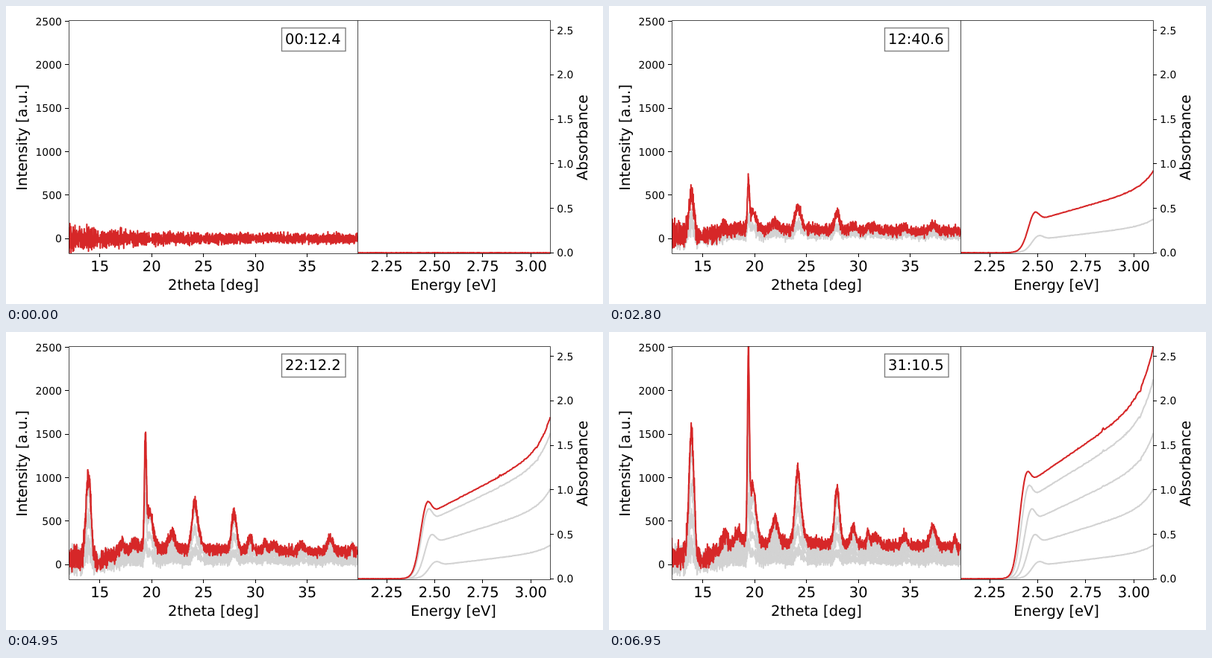
Write an HTML page that moves like this. It is 800 by 400 pixels and loops after 7000 ms.

```html
<!DOCTYPE html>
<html lang="en">
<head>
<meta charset="utf-8">
<title>Diffraction and absorbance over time</title>
<style>
  html, body { margin: 0; width: 100%; height: 100%; overflow: hidden; background: #fff; }
  svg { display: block; width: 800px; height: 400px; }
  text { font: 19.44px "DejaVu Sans", sans-serif; text-rendering: geometricPrecision; }
  .small { font-size: 13.89px; }
  .trace { fill: none; stroke-width: 2.08; stroke-linejoin: round; }
  .past { stroke: #d3d3d3; }
  .now { stroke: #d62728; }
  .spine { fill: none; stroke: #000; stroke-width: 0.7; }
  .tick { stroke: #000; stroke-width: 1; }
</style>
</head>
<body>
<svg viewBox="0 0 800 400">
  <defs>
    <clipPath id="clipLeft"><rect x="84" y="19" width="387.5" height="313"/></clipPath>
    <clipPath id="clipRight"><rect x="471.5" y="19" width="258" height="313"/></clipPath>
  </defs>
  <g id="left" clip-path="url(#clipLeft)"></g>
  <g id="right" clip-path="url(#clipRight)"></g>
  <g id="axes"></g>
  <rect x="369.5" y="29.5" width="85.5" height="31" fill="#fff" stroke="#7f7f7f" stroke-width="1.39"/>
  <text id="clock" x="411.3" y="51" text-anchor="middle"></text>
</svg>
<script>
const STEP = 50, STEPS = 140, SNAPSHOT_EVERY = 30;
const $ = id => document.getElementById(id);

function add(parent, name, attrs, text = '') {
  const el = document.createElementNS('http://www.w3.org/2000/svg', name);
  for (const key in attrs) el.setAttribute(key, attrs[key]);
  el.textContent = text;
  return parent.appendChild(el);
}

// Scales
const angleX = d => 84 + (d - 12) * 13.9;
const countY = c => 312.2 - c * 0.11668;
const energyX = e => 471.4 + (e - 2.1) * 257.7;
const absorbY = a => 331.2 - a * 119.4;

// Shapes
const bell = (x, centre, width) => Math.exp(-0.5 * ((x - centre) / width) ** 2);
const sigmoid = u => 1 / (1 + Math.exp(-u));

function normalNoise(seed) {
  let s = (seed * 7919 + 17) >>> 0;
  const uniform = () => {
    s = (s + 0x6d2b79f5) >>> 0;
    let z = Math.imul(s ^ (s >>> 15), s | 1);
    z ^= z + Math.imul(z ^ (z >>> 7), z | 61);
    return ((z ^ (z >>> 14)) >>> 0) / 4294967296;
  };
  return () => (uniform() + uniform() + uniform() + uniform() - 2) * 1.732;
}

// Crystals start to form at step 10 and are complete at the last step.
const growth = (n, power = 1.1) => Math.max(0, (n - 10) / (STEPS - 11)) ** power;

// Diffraction peaks: angle, final height, width if unusual
const PEAKS = [[13.906, 1440], [17.14, 130], [18.37, 130], [19.8, 650, 0.32],
  [21.95, 260, 0.3], [24.11, 715], [24.5, 230, 0.3], [27.95, 630], [29.5, 185],
  [30.92, 140, 0.12], [31.64, 95, 0.35], [34.45, 125], [37.2, 220, 0.3], [39.3, 125, 0.1]];

const background = d => 95 + 155 * sigmoid((d - 16.6) / 0.7)
  - 55 * bell(d, 15, 0.5) - 3.3 * Math.max(0, d - 24);

const SAMPLES = Array.from({ length: 2790 }, (_, i) => {
  const d = 12 + i * 0.01;
  const seam = 14.92 + 5 * Math.round((d - 14.92) / 5);
  return {
    x: angleX(d).toFixed(2),
    base: background(d),
    peaks: PEAKS.reduce((sum, [c, h, w = 0.24]) => sum + h * bell(d, c, w), 0),
    sharp: 1900 * bell(d, 19.395, 0.09),
    spread: 27 + 50 * Math.exp((12 - d) / 4.5),
    quiet: 1 - 0.9 * bell(d, seam, 0.06)
  };
});

function diffractionPath(n) {
  const noise = normalNoise(n + 1);
  const g = growth(n), gSharp = growth(n, 1.3), lift = n / (STEPS - 1);
  return 'M' + SAMPLES.map(s => {
    const c = s.base * lift + s.peaks * g + s.sharp * gSharp;
    const sigma = Math.sqrt(s.spread ** 2 + 0.6 * c) * s.quiet;
    return s.x + ' ' + countY(c + sigma * noise()).toFixed(2);
  }).join('L');
}

// Absorbance: an edge that sharpens and moves left, an exciton peak, a slope and an upturn
function absorbancePath(n) {
  const noise = normalNoise(n + 501);
  const g = growth(n), early = 1 - Math.sqrt(g);
  const edge = 548 + 24 * early;
  const pts = [];
  for (let x = 471.4; x <= 730; x++) {
    const slope = (1.13 - 0.33 * g) * (x - 571) / 158;
    const a = g * (
      1.13 * (1 + slope) * sigmoid((x - edge) / (3.7 + 2 * early))
      + 0.45 * (1 - 0.62 * g) * bell(x, edge + 11.5, 5 + 2 * early)
      + 0.56 * Math.exp((x - 729) / 17));
    const glitch = 0.018 * a * g * (bell(x, 662, 0.8) - bell(x, 712, 0.9));
    const jitter = noise() * (0.0008 + 0.002 * a * (x - 471) / 258);
    pts.push(x.toFixed(1) + ' ' + absorbY(a + glitch + jitter).toFixed(2));
  }
  return 'M' + pts.join('L');
}

// [step, elapsed seconds]; the measurement interval drifts slightly
const CLOCK = [[0, 12.4], [17, 240.9], [33, 453], [56, 760.6], [86, 1159.4], [111, 1491.7], [139, 1870.5]];

function clockText(n) {
  const i = CLOCK.findIndex(([step], k) => k > 0 && n <= step);
  const [n0, s0] = CLOCK[i - 1], [n1, s1] = CLOCK[i];
  const tenths = Math.round(10 * (s0 + (s1 - s0) * (n - n0) / (n1 - n0)));
  const two = v => String(v).padStart(2, '0');
  return `${two(Math.floor(tenths / 600))}:${two(Math.floor(tenths / 10) % 60)}.${tenths % 10}`;
}

function drawAxes() {
  const g = $('axes');
  const line = (d, cls = 'tick') => add(g, 'path', { d, class: cls });
  const label = (x, y, text, anchor = 'middle', extra = {}) =>
    add(g, 'text', { x, y, 'text-anchor': anchor, ...extra }, text);
  const snap = v => Math.floor(v) + 0.5;
  const bottomTick = (x, text) => {
    line(`M${snap(x)} 332v5`);
    label(x, 356, text);
  };
  const sideTick = (x, y, labelX, text, anchor) => {
    line(`M${x} ${snap(y)}h5`);
    label(labelX, Math.round(y + 5.1), text, anchor, { class: 'small' });
  };
  const vertical = (x, y, text) =>
    label(0, 0, text, 'middle', { transform: `translate(${x} ${y}) rotate(-90)` });

  line('M84.5 19.5H729.5V332.5H84.5ZM471.5 19.5V332.5', 'spine');
  for (let d = 15; d <= 35; d += 5) bottomTick(angleX(d), d);
  for (let e = 2.25; e <= 3; e += 0.25) bottomTick(energyX(e), e.toFixed(2));
  for (let c = 0; c <= 2500; c += 500) sideTick(79, countY(c), 74.8, c, 'end');
  for (let a = 0; a <= 2.5; a += 0.5) sideTick(729, absorbY(a), 738.3, a.toFixed(1), 'start');
  label(278, 381, '2theta [deg]');
  label(599.5, 381, 'Energy [eV]');
  vertical(28.3, 176.5, 'Intensity [a.u.]');
  vertical(779.3, 176.5, 'Absorbance');
}

drawAxes();
const snapshots = [];
for (let n = SNAPSHOT_EVERY; n < STEPS; n += SNAPSHOT_EVERY) {
  const paths = [
    add($('left'), 'path', { class: 'trace past', d: diffractionPath(n) }),
    add($('right'), 'path', { class: 'trace past', d: absorbancePath(n) })
  ];
  snapshots.push({ n, paths });
}
const diffraction = add($('left'), 'path', { class: 'trace now' });
const absorbance = add($('right'), 'path', { class: 'trace now' });

let shown = -1;
function render(ms) {
  const n = Math.floor(ms / STEP) % STEPS;
  if (n === shown) return;
  shown = n;
  diffraction.setAttribute('d', diffractionPath(n));
  absorbance.setAttribute('d', absorbancePath(n));
  $('clock').textContent = clockText(n);
  for (const s of snapshots)
    for (const p of s.paths) p.style.display = n >= s.n ? '' : 'none';
}

const start = performance.now();
function tick() {
  render(Math.max(0, performance.now() - start));
  requestAnimationFrame(tick);
}
tick();
</script>
</body>
</html>
```
